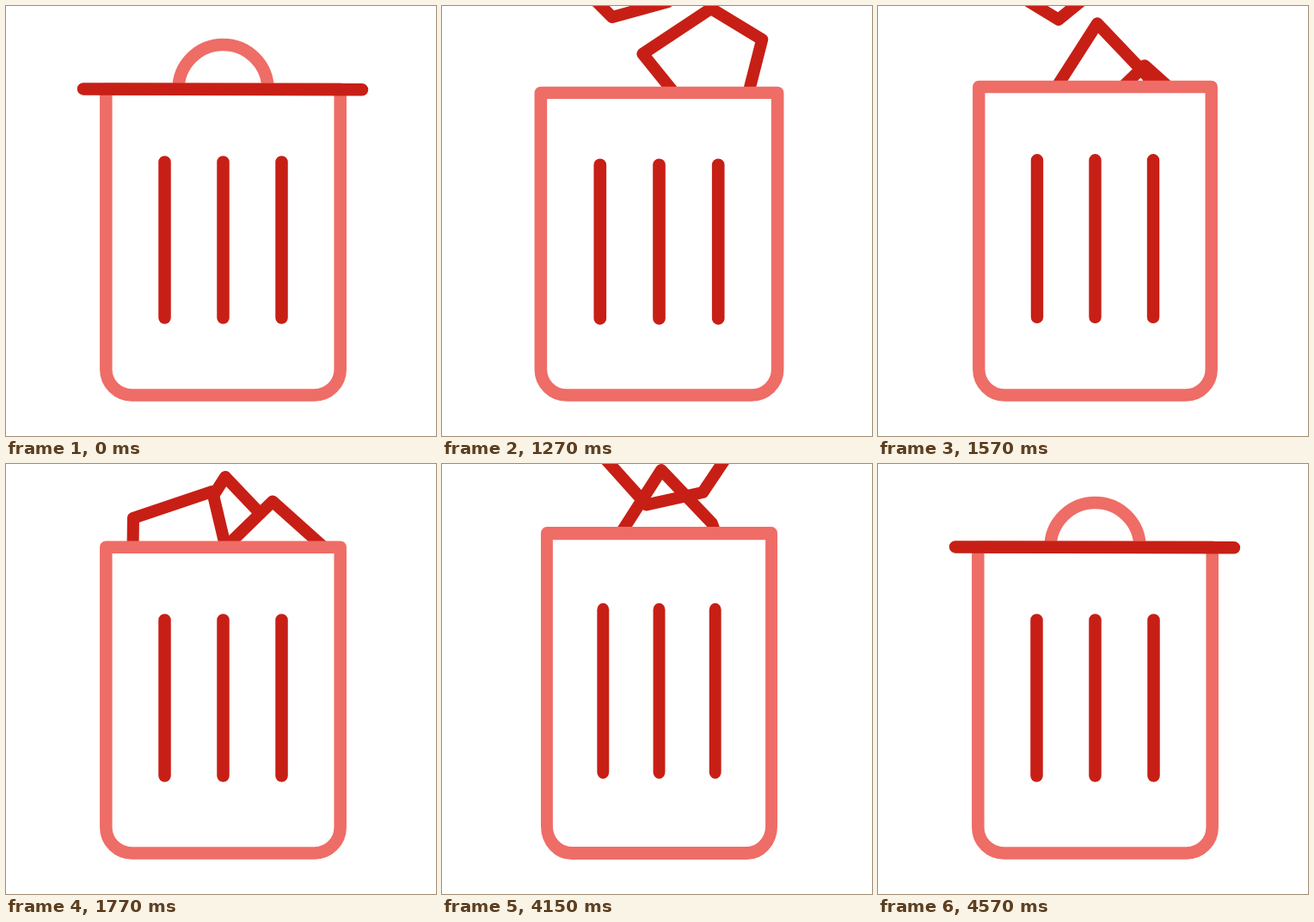
Write an HTML page that moves like this. It is 500 px wide and 500 px high and loops after 4600 ms.

```html
<!DOCTYPE html>
<html lang="en">
<head>
<meta charset="utf-8">
<title>Trash bin</title>
<style>
  html, body { margin: 0; width: 100%; height: 100%; overflow: hidden; background: #fff; }
  svg { display: block; width: 100%; height: 100%; }
  path { fill: none; stroke-width: 14.5; stroke-linecap: round; stroke-linejoin: round; }
  .light { stroke: #ee6d66; }
  .dark { stroke: #c71f16; }
  .paper { stroke-width: 14; }
  .handle { stroke-linecap: butt; }
</style>
</head>
<body>
<svg viewBox="0 0 500 500">
  <clipPath id="aboveRim"><rect id="clip" x="-100" y="-400" width="700"/></clipPath>
  <g clip-path="url(#aboveRim)">
    <path class="dark paper" d="M66 35 L-26 60 L-71 7 L-13.6 -82.5 L45 -21 Z"/>
    <path class="dark paper" d="M-33 70 L33 59 L75 3 L-1 -65 L-80 12 Z"/>
    <path class="dark paper" d="M41 -72 L-51 -41 L-52 28 L3 54 L66 33 Z"/>
  </g>
  <g id="bin">
    <path class="light" d="M116.3 96.7 H388.7 V422.5 a30 30 0 0 1 -30 30 H146.3 a30 30 0 0 1 -30 -30 Z"/>
    <path class="dark" d="M184.5 181.5 V362.5 M252.5 181.5 V362.5 M320.5 181.5 V362.5"/>
  </g>
  <g id="lid">
    <path class="light handle" d="M-51.5 0 A52 52 0 0 1 52.5 0"/>
    <path class="dark" d="M-162 -.5 L162 .3"/>
  </g>
</svg>
<script>
// The bin fills in 31 steps, rests, and the same steps run backwards.
const LOOP = 4600, OPEN = 1020, CLOSE = 3820, STEP = 25, LAST = 31;
const BIN_X = 252.5, BIN_BOTTOM = 452.5, BIN_HEIGHT = 355.8;

// x, y: resting place; land: step of impact; settle: steps of turning after it;
// drift, spin: sideways motion and rotation per step.
const papers = [
  { x: 268.6, y: 97.5, land: 11.3, drop: 205, settle: 5, drift: 7.25, spin: 30.5 },
  { x: 311, y: 108, land: 21, drop: 139, settle: 2, drift: -7.3, spin: -.5 },
  { x: 199, y: 102, land: 25.5, drop: 202, settle: 4, drift: 1.46, spin: -20 }
];
const shapes = document.querySelectorAll('.paper');
const [bin, lid, clip] = ['bin', 'lid', 'clip'].map(id => document.getElementById(id));

// Height of the bin swings between these extremes: [step, scale].
const swings = [[9, 1], [13, .977], [17, 1.045], [20, .977], [24, 1.013], [27, .977], [29, 1]];

function stretchAt(s) {
  const i = swings.findIndex(([step]) => step > s);
  if (i < 1) return 1;
  const [s0, a] = swings[i - 1], [s1, b] = swings[i];
  return a + (b - a) * (1 - Math.cos(Math.PI * (s - s0) / (s1 - s0))) / 2;
}

// Sinking below the resting place after impact, and coming back.
const dip = t => t > 0 ? 114 * t * Math.exp(-1.05 * t) : 0;
// Height above the resting place, t steps before impact.
const height = (drop, t) => drop * (1 - Math.exp(-t / 2)) + 3 * t;

const move = (node, x, y, angle) =>
  node.setAttribute('transform', `translate(${x} ${y}) rotate(${angle})`);

function drawPaper(paper, i, s, lift) {
  const since = s - paper.land, next = papers[i + 1];
  const turning = Math.max(0, paper.settle - since);
  const push = next ? dip(s - next.land) / 4 : 0;
  const y = since < 0 ? -height(paper.drop, -since) : dip(since) + push - lift;
  move(shapes[i], paper.x + paper.drift * turning, paper.y + y, paper.spin * turning);
  shapes[i].style.visibility = since > -12 ? 'visible' : 'hidden';
  // Settled papers cover the ones behind them.
  shapes[i].style.fill = s > 25 ? '#fff' : 'none';
}

function draw(s) {
  const sy = stretchAt(s), sx = 1 - .92 * (sy - 1);
  const lift = .6 * BIN_HEIGHT * (sy - 1);
  bin.setAttribute('transform',
    `translate(${BIN_X} ${BIN_BOTTOM}) scale(${sx} ${sy}) translate(${-BIN_X} ${-BIN_BOTTOM})`);
  clip.setAttribute('height', 400 + BIN_BOTTOM - BIN_HEIGHT * sy);
  papers.forEach((paper, i) => drawPaper(paper, i, s, lift));
  const u = s / 10;
  move(lid, 252 - 90 * u, 97 - 180 * u ** 1.6, -25 * u);
}

function stepAt(t) {
  const passed = start => Math.floor((t - start) / STEP) + 1;
  const s = t < CLOSE ? passed(OPEN) : LAST - passed(CLOSE);
  return Math.max(0, Math.min(LAST, s));
}

const begin = performance.now();
let shown = -1;
function tick() {
  const s = stepAt((performance.now() - begin) % LOOP);
  if (s !== shown) draw(shown = s);
  requestAnimationFrame(tick);
}
tick();
</script>
</body>
</html>
```
